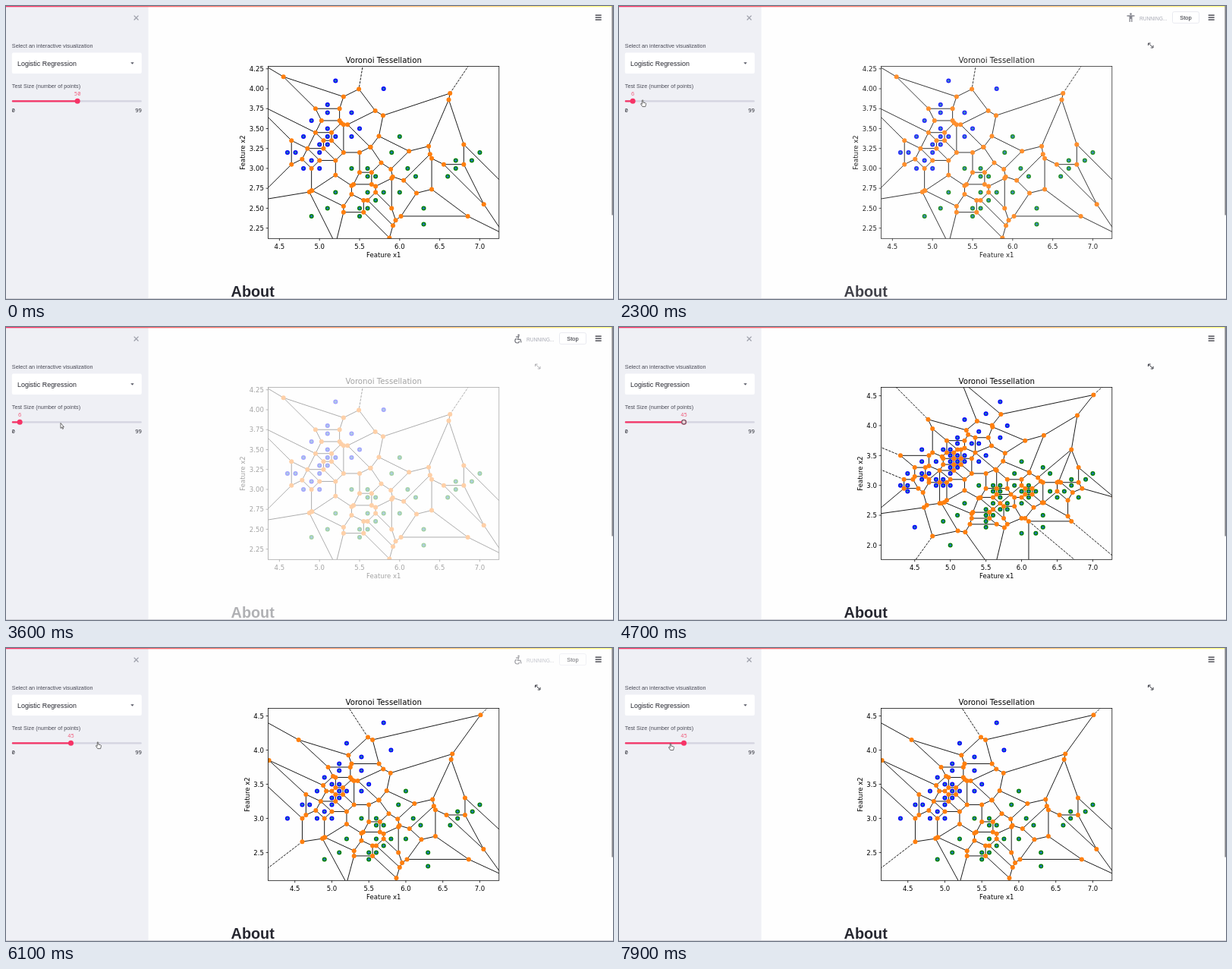
Write an HTML page that moves like this. It is 800x386 px and loops after 8000 ms.

```html
<!DOCTYPE html>
<html lang="en">
<head>
<meta charset="utf-8">
<title>Voronoi Tessellation</title>
<style>
  html, body { margin: 0; width: 100%; height: 100%; overflow: hidden; background: #fefefe; }
  svg { display: block; width: 100vw; height: 100vh; }
  text { font-family: "Liberation Sans", Arial, sans-serif; fill: #262730; }
  .plot text { font: 8.5px "DejaVu Sans", sans-serif; fill: #000; }
  .plot .title { font-size: 10.2px; }
  .mono { font: 7.3px "Noto Sans Mono", monospace; }
  .label { font-size: 7.25px; fill: #4a4b57; }
  .middle { text-anchor: middle; }
  .end { text-anchor: end; }
</style>
</head>
<body>
<svg viewBox="0 0 800 386" preserveAspectRatio="none">
  <defs>
    <clipPath id="axes"><rect x="345.6" y="79.6" width="304.2" height="226.7"/></clipPath>
    <linearGradient id="bar" gradientUnits="userSpaceOnUse" x1="0" x2="800" spreadMethod="reflect">
      <stop offset="0" stop-color="#f63366"/><stop offset="1" stop-color="#fffd80"/>
    </linearGradient>
  </defs>
  <rect width="800" height="386" fill="#fefefe"/>

  <g id="content">
    <g id="plots"></g>
    <text x="296.6" y="383.3" font-size="19.8" font-weight="700">About</text>
  </g>
  <g id="expand" stroke="#33343d" fill="none">
    <path d="M698 49.5L703.5 54.3M697.5 52V49H700.7M704 51.8V55H700.8"/>
  </g>

  <rect width="187.6" height="386" fill="#eff0f5"/>
  <path d="M168.7 12.7l5.8 5.8m0-5.8l-5.8 5.8" stroke="#9b9da8" stroke-width="1.2"/>
  <text class="label" x="7.8" y="54.5">Select an interactive visualization</text>
  <rect x="7.8" y="61.5" width="171" height="27.5" rx="2" fill="#fff"/>
  <text x="15" y="78.6" font-size="8.93">Logistic Regression</text>
  <path d="M164.3 74.3h4.4l-2.2 2.4z" fill="#555763"/>
  <text class="label" x="7.8" y="108.2">Test Size (number of points)</text>
  <rect x="7.8" y="124.2" width="171" height="2.2" rx="1" fill="#d3d4e0"/>
  <rect id="fill" x="7.8" y="124.2" height="2.2" rx="1" fill="#f63366"/>
  <circle id="thumb" cy="125.3" r="3.5" fill="#f63366"/>
  <text id="value" class="mono middle" y="118.2" style="fill:#f0607f"></text>
  <text class="mono" x="7.6" y="139.8">0</text>
  <text class="mono end" x="179" y="139.8">99</text>

  <g id="running">
    <g id="standing" stroke="#85868f" fill="none" stroke-width="1.3">
      <circle cx="674.5" cy="10.6" r="1.3" fill="#85868f" stroke="none"/>
      <path d="M669.5 13H679.5M673.2 13V21M675.8 13V21M674.5 13V17"/>
    </g>
    <g id="seated" stroke="#77787f" fill="none" stroke-width="1.2">
      <circle cx="675.6" cy="10.6" r="1.2" fill="#77787f" stroke="none"/>
      <path d="M672 13.2L675.8 12.6L674.4 16.4H678L679 20.5M673 15.3A2.9 2.9 0 1 0 676.6 18.6"/>
    </g>
    <text x="686" y="18.6" font-size="6.6" style="fill:#a5a7b2">RUNNING...</text>
    <rect x="729.5" y="7.6" width="35" height="15" rx="2.2" fill="#fff" stroke="#e4e5ec" stroke-width=".8"/>
    <text class="middle" x="747" y="17.8" font-size="7.5">Stop</text>
  </g>
  <path d="M776.7 12.2h8M776.7 15.2h8M776.7 18.2h8" stroke="#2c2d36" stroke-width="1.3"/>

  <rect width="800" height="1.3" fill="url(#bar)"/>
  <rect x="798.4" width="1.6" height="275.5" fill="#85858a"/>
  <rect y="385" width="800" height="1" fill="#cfcfd6"/>

  <g id="cursor" stroke="#333" stroke-width=".7" fill="#fff" stroke-linejoin="round">
    <path id="hand" d="M-1.6-4c.8-.5 1.4 0 1.4.8V-.8L2.6-.2C3.4 0 3.6.5 3.4 1.3L2.6 4.6H-1.2L-3.4 1.4c-.4-.8.4-1.2 1-.6l.6.6z"/>
    <path id="arrow" d="M0-3.5V3.4L1.5 2 2.6 4.4 3.6 3.9 2.5 1.7H4.4z"/>
    <circle id="grab" r="2.7" fill="#f3d3d9" stroke="#66606a" stroke-width="1.1"/>
  </g>
</svg>
<script>
const $ = id => document.getElementById(id);
const LOOP = 8000;
const BOX = { left: 345.6, top: 79.6, width: 304.2, height: 226.7 };

// Points in tenths of a unit: row y -> list of x.
const small = {
  blue: { 41: [52], 40: [58], 38: [51], 37: [51, 54], 36: [49], 35: [51, 55], 34: [48, 51, 52, 54],
    33: [50, 51], 32: [46, 47, 50], 31: [49], 30: [48, 50] },
  green: { 34: [60], 32: [59, 70], 31: [67, 69], 30: [54, 56, 61, 67], 29: [56, 57, 62, 66],
    27: [52, 56, 58, 60], 26: [57], 25: [51, 55, 56, 63], 24: [49, 55], 23: [63] }
};
const medium = { blue: { 44: [57], 39: [54], 35: [50], 30: [44] }, green: {} };
const large = {
  blue: { 42: [55], 38: [57], 37: [53], 36: [46, 50], 35: [52], 34: [46, 50], 32: [44],
    31: [46, 48], 30: [43, 49], 29: [44], 23: [45] },
  green: { 33: [63], 32: [64], 30: [57, 59], 29: [60, 61, 64], 28: [57, 61, 65, 68],
    26: [55, 58], 23: [55], 22: [60, 62], 20: [50] }
};

const collect = sets => sets.flatMap(set => ['blue', 'green'].flatMap(color =>
  Object.entries(set[color]).flatMap(([y, xs]) => xs.map(x => ({ x, y: +y, color })))));

// Each ridge is a bisector clipped by the half-planes of all other points.
function voronoi(points) {
  const ridges = [], vertices = new Map();
  const norm = p => p.x * p.x + p.y * p.y;
  points.forEach((a, i) => points.slice(i + 1).forEach(b => {
    const mx = (a.x + b.x) / 2, my = (a.y + b.y) / 2, dx = a.y - b.y, dy = b.x - a.x;
    let lo = -Infinity, hi = Infinity;
    for (const c of points) {
      if (c === a || c === b) continue;
      const ex = c.x - a.x, ey = c.y - a.y;
      const slope = 2 * (dx * ex + dy * ey);
      const room = norm(c) - norm(a) - 2 * (mx * ex + my * ey);
      if (slope > 0) hi = Math.min(hi, room / slope);
      else if (slope < 0) lo = Math.max(lo, room / slope);
      else if (room < 0) return;
      if (hi - lo < 1e-9) return;
    }
    const far = 40 / Math.hypot(dx, dy);
    const dashed = !isFinite(lo) || !isFinite(hi);
    const at = t => ({ x: mx + t * dx, y: my + t * dy });
    const ends = [lo, hi].map(t => isFinite(t) ? at(t) : at(t < 0 ? hi - far : lo + far));
    [lo, hi].forEach((t, k) => {
      if (isFinite(t)) vertices.set(ends[k].x.toFixed(4) + ',' + ends[k].y.toFixed(4), ends[k]);
    });
    ridges.push({ ends, dashed });
  }));
  return { ridges, vertices: [...vertices.values()] };
}

function range(values) {
  const min = Math.min(...values), max = Math.max(...values), pad = (max - min) / 10;
  return [min - pad, max + pad];
}

function plot(points, yStep, digits) {
  const [x0, x1] = range(points.map(p => p.x)), [y0, y1] = range(points.map(p => p.y));
  const bottom = BOX.top + BOX.height;
  const X = x => BOX.left + (x - x0) / (x1 - x0) * BOX.width;
  const Y = y => bottom - (y - y0) / (y1 - y0) * BOX.height;
  const at = p => `${X(p.x).toFixed(2)} ${Y(p.y).toFixed(2)}`;
  const dot = (p, r, color) =>
    `<circle cx="${X(p.x).toFixed(2)}" cy="${Y(p.y).toFixed(2)}" r="${r}" fill="${color}"/>`;
  const { ridges, vertices } = voronoi(points);
  const path = dashed => ridges.filter(r => r.dashed === dashed)
    .map(r => `M${at(r.ends[0])}L${at(r.ends[1])}`).join('');
  const ticks = (lo, hi, step) => {
    const list = [];
    for (let v = Math.ceil(lo / step) * step; v <= hi; v += step) list.push(v);
    return list;
  };
  const xTicks = ticks(x0, x1, 5), yTicks = ticks(y0, y1, yStep);
  const labelX = digits === 2 ? 315 : 320.6;
  return `<g class="plot">
    <g clip-path="url(#axes)">
      <g fill="none" stroke="#000" stroke-width=".9">
        <path d="${path(false)}"/><path d="${path(true)}" stroke-dasharray="3.2 1.4"/>
      </g>
      ${points.map(p => dot(p, 3, p.color === 'blue' ? '#0000ff' : '#008000')).join('')}
      ${points.map(p => dot(p, 1.6, '#1f77b4')).join('')}
      ${vertices.map(p => dot(p, 3, '#ff7f0e')).join('')}
    </g>
    <rect x="${BOX.left}" y="${BOX.top}" width="${BOX.width}" height="${BOX.height}"
      fill="none" stroke="#000" stroke-width=".75"/>
    <path stroke="#000" stroke-width=".75" d="${xTicks.map(v => `M${X(v)} ${bottom}v3`).join('')}
      ${yTicks.map(v => `M${BOX.left} ${Y(v)}h-3`).join('')}"/>
    ${xTicks.map(v => `<text class="middle" x="${X(v)}" y="319.7">${(v / 10).toFixed(1)}</text>`).join('')}
    ${yTicks.map(v => `<text class="end" x="339.8" y="${Y(v) + 3.2}">${(v / 10).toFixed(digits)}</text>`).join('')}
    <text class="title middle" x="497.7" y="74.6">Voronoi Tessellation</text>
    <text class="middle" x="497.7" y="331">Feature x1</text>
    <text class="middle" transform="translate(${labelX} 193) rotate(-90)">Feature x2</text>
  </g>`;
}

$('plots').innerHTML = plot(collect([small]), 2.5, 2)
  + plot(collect([small, medium, large]), 5, 1)
  + plot(collect([small, medium]), 5, 1);
const plots = [...$('plots').children];

// time, x, y
const cursorPath = [
  [150, 420, 374], [900, 18, 128], [1500, 18, 128], [1800, 31, 128], [2700, 33, 128],
  [3500, 72, 130], [3800, 72, 130], [4500, 85.5, 125.2], [5000, 85.5, 125.2],
  [5900, 122, 128], [6600, 122, 128], [7700, 69, 130], [8000, 69, 130]
];

const clamp = v => Math.max(0, Math.min(1, v));
const ramp = (t, from, to) => clamp((t - from) / (to - from));
const show = (el, on) => el.setAttribute('visibility', on ? 'inherit' : 'hidden');
const fade = (el, value) => el.setAttribute('opacity', value.toFixed(3));

function cursorAt(t) {
  const next = Math.max(1, cursorPath.findIndex(k => k[0] > t));
  const [ta, xa, ya] = cursorPath[next - 1], [tb, xb, yb] = cursorPath[next];
  const p = ramp(t, ta, tb), e = p * p * (3 - 2 * p);
  return [xa + (xb - xa) * e, ya + (yb - ya) * e];
}

function contentOpacity(t) {
  if (t < 4000) return 1 - .64 * Math.pow(ramp(t, 1900, 3300), 1.3);
  if (t > 5400 && t < 5900) return 1 - .25 * ramp(t, 5400, 5900);
  return 1;
}

function render(t) {
  const value = t < 1200 ? 50 : t < 4600 ? 6 : 45;
  const x = 171 * value / 99;
  $('fill').setAttribute('width', x);
  $('thumb').setAttribute('cx', 7.8 + x);
  $('value').setAttribute('x', 7.8 + x);
  $('value').textContent = value;

  const current = t < 4000 ? 0 : t < 5900 ? 1 : 2;
  plots.forEach((p, i) => show(p, i === current));
  const opacity = contentOpacity(t);
  fade($('content'), opacity);
  fade($('expand'), ramp(t, 1900, 2100) * opacity);

  const running = t < 4500
    ? ramp(t, 1400, 1800) * (1 - ramp(t, 4000, 4400))
    : ramp(t, 5000, 5400) * (1 - ramp(t, 5900, 6500));
  fade($('running'), running);
  show($('standing'), t < 2900 || (t > 4500 && t < 5600));
  show($('seated'), (t >= 2900 && t <= 4500) || t >= 5600);

  const [cx, cy] = cursorAt(t);
  const grabbing = t >= 4500 && t < 5000, pointing = t >= 3000 && t < 4500;
  $('cursor').setAttribute('transform', `translate(${cx} ${cy})`);
  show($('cursor'), t >= 150);
  show($('grab'), grabbing);
  show($('arrow'), pointing || t < 800);
  show($('hand'), !grabbing && !pointing && t >= 800);
}

function loop() {
  render(performance.now() % LOOP);
  requestAnimationFrame(loop);
}
loop();
</script>
</body>
</html>
```
